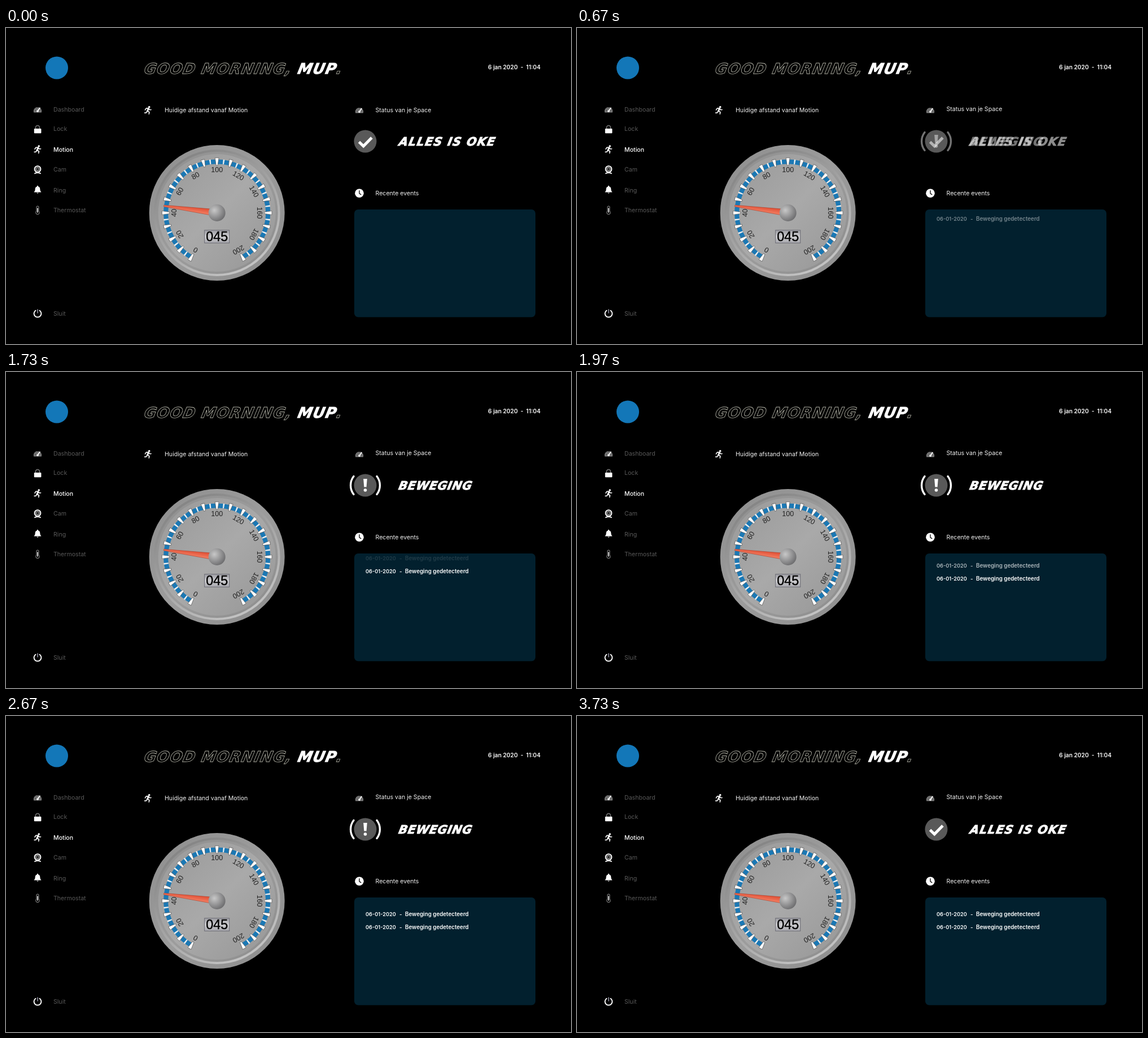
Recreate the animation shown at these times as an HTML page. Size 1001 by 559 pixels, loop 3.76 s.

```html
<!DOCTYPE html>
<html lang="nl">
<head>
<meta charset="utf-8">
<title>Dashboard</title>
<style>
  html, body { margin: 0; width: 100%; height: 100%; overflow: hidden; background: #000; }
  svg { display: block; width: 100%; height: 100%; }
  text { font: 400 10.6px Inter, sans-serif; fill: #f2f2f2; white-space: pre; }
  .dim text { fill: #585858; }
  text.on { font-weight: 500; fill: #fff; }
  text.date { font-weight: 600; font-size: 10.2px; fill: #fff; }
  .head text, .status text { font: italic 700 26px "DejaVu Sans", sans-serif; fill: #fff; stroke: #fff; stroke-width: .9; }
  .head text { letter-spacing: 1px; }
  .head text.line { fill: none; stroke: #b4b4a8; }
  .status text { font-size: 20.5px; }
  .event text { font-weight: 600; font-size: 9.8px; fill: #fff; }
  .event text.day { font-size: 9.2px; }
  #dial text { font: 12.6px "Liberation Sans", Arial, sans-serif; fill: #222; text-anchor: middle; }
  #dial text.count { font-size: 23.4px; fill: #000; stroke: #000; stroke-width: .4; }
  .stroke { fill: none; stroke: #fff; stroke-linecap: round; stroke-linejoin: round; }
</style>
</head>
<body>
<svg viewBox="0 0 1001 559">
  <defs>
    <linearGradient id="rim" x1="0" y1="0" x2="1" y2="1">
      <stop offset="0" stop-color="#8e8e8e"/><stop offset=".5" stop-color="#9c9c9c"/><stop offset="1" stop-color="#8c8c8c"/>
    </linearGradient>
    <linearGradient id="bevel" x1="0" y1="0" x2=".6" y2="1">
      <stop offset="0" stop-color="#7a7a7a"/><stop offset="1" stop-color="#c2c2c2"/>
    </linearGradient>
    <linearGradient id="face" x1="0" y1="0" x2="1" y2="1">
      <stop offset="0" stop-color="#989898"/><stop offset=".5" stop-color="#a9a9a9"/><stop offset="1" stop-color="#969696"/>
    </linearGradient>
    <linearGradient id="needle">
      <stop offset="0" stop-color="#f58468"/><stop offset="1" stop-color="#de4a30"/>
    </linearGradient>
    <radialGradient id="hub" cx=".35" cy=".35" r=".75">
      <stop offset="0" stop-color="#c8c8c8"/><stop offset="1" stop-color="#666668"/>
    </radialGradient>
    <linearGradient id="box" x1="0" y1="0" x2="0" y2="1">
      <stop offset="0" stop-color="#9a9aa0"/><stop offset=".5" stop-color="#cfcfd2"/><stop offset="1" stop-color="#a6a6ac"/>
    </linearGradient>
    <g id="meter">
      <path d="M-6.8 5A7.2 7.2 0 1 1 6.8 5Z" fill="#777"/>
      <path d="M-4.5 1.5h1.5M-3-2.2l1 1M0-4.5v1.5M4.5 1.5h-1" stroke="#222" stroke-width="1"/>
      <path d="M0 2.5L4-3" class="stroke" stroke-width="1.7"/>
      <circle cy="2.8" r="1.7" fill="#fff"/>
    </g>
    <g id="runner">
      <circle cx="2.2" cy="-5.6" r="1.8" fill="#fff"/>
      <path d="M1-2.6L-1 1.6" class="stroke" stroke-width="3"/>
      <path d="M-5-.4L-3.2-3.2L1-3.2L3.2-.6L5.6-.8M-1 1.6L2.4 3.4L1.8 6.8M-1.6 2L-3 4.6L-5.8 4.8" class="stroke" stroke-width="1.6"/>
    </g>
  </defs>

  <circle cx="90" cy="70.5" r="20" fill="#1377b8"/>

  <g class="head">
    <text class="line" transform="translate(243.5 80.5) skewX(-12)">GOOD MORNING,</text>
    <text transform="translate(515.5 80.5) skewX(-12)">MUP</text>
    <text class="line" transform="translate(584 80.5) skewX(-12)">.</text>
  </g>
  <text class="date" x="947" y="73.2" text-anchor="end">6 jan 2020  -  11:04</text>

  <g class="dim">
    <text x="84" y="148.3">Dashboard</text>
    <text x="84" y="181.5">Lock</text>
    <text x="84" y="254.4">Cam</text>
    <text x="84" y="290.8">Ring</text>
    <text x="84" y="325.6">Thermostat</text>
    <text x="84" y="508.5">Sluit</text>
  </g>
  <text class="on" x="84" y="218.7">Motion</text>

  <use href="#meter" x="56" y="144.5"/>
  <path d="M52.5 179v-3a3.5 3.5 0 0 1 7 0v3" class="stroke" style="stroke:#777" stroke-width="1.7"/>
  <rect x="49.8" y="178" width="12.6" height="8.3" rx="1" fill="#fff"/>
  <use href="#runner" x="56" y="214.6"/>
  <circle cx="56" cy="249.6" r="5.5" fill="#555" stroke="#fff" stroke-width="1.8"/>
  <circle cx="56" cy="249.6" r="2.6" fill="#222" stroke="#aaa"/>
  <path d="M51 257.3q5-2.6 10 0" class="stroke" stroke-width="1.8"/>
  <path d="M49.5 290.5q2.2-1.8 2.2-5.5q0-4 3.3-4.6v-1.4h2v1.4q3.3.6 3.3 4.6q0 3.7 2.2 5.5Z" fill="#fff"/>
  <path d="M54.2 291.4h3.6q-1.8 2.4-3.6 0" fill="#fff"/>
  <path d="M54 324v-6.8a2 2 0 0 1 4 0v6.8a3.2 3.2 0 1 1-4 0Z" fill="none" stroke="#777" stroke-width="1.2"/>
  <path d="M56 319v7" class="stroke" stroke-width="1.5"/>
  <path d="M52.5 499.7a6.4 6.4 0 1 0 7 0" class="stroke" stroke-width="1.9"/>
  <path d="M56 498v6" class="stroke" style="stroke:#889" stroke-width="1.7"/>

  <use href="#runner" x="251.5" y="145.3"/>
  <text x="281" y="148.8">Huidige afstand vanaf Motion</text>
  <use href="#meter" x="626" y="145.5"/>
  <text id="title" x="654.5">Status van je Space</text>
  <circle cx="626" cy="292.3" r="7.8" fill="#fff"/>
  <path d="M626 287.8v4.8l2.8 2" class="stroke" style="stroke:#111" stroke-width="1.4"/>
  <text x="654.5" y="295.6">Recente events</text>

  <g id="dial" transform="translate(373.7 327)"></g>

  <circle cx="636.5" cy="200.5" r="20" fill="#595959"/>
  <g class="status" id="calm">
    <path d="M625.5 201.5l7.8 7.5L648 194" class="stroke" style="stroke-linecap:butt;stroke-linejoin:miter" stroke-width="5"/>
    <text transform="translate(695 208) skewX(-12)" letter-spacing="1.4">ALLES IS OKE</text>
  </g>
  <g class="status" id="alarm">
    <path d="M633.2 189h6.6l-1.2 14.4h-4.2Z" fill="#fff"/>
    <circle cx="636.5" cy="209" r="2.8" fill="#fff"/>
    <path d="M616 184.5a26.3 26.3 0 0 0 0 32M657 184.5a26.3 26.3 0 0 1 0 32" class="stroke" stroke-width="3.4"/>
    <text transform="translate(694.5 208) skewX(-12)" letter-spacing=".7">BEWEGING</text>
  </g>

  <rect x="617" y="321" width="321" height="190.5" rx="7" fill="#02202e"/>
  <g class="event" id="first"></g>
  <g class="event" id="second"></g>
</svg>

<script>
const $ = id => document.getElementById(id);
const LOOP = 3760, FADE = 600, ROW = 23.5;

function buildDial() {
  const angle = v => v * 1.5 - 150;
  const ring = (r, fill) => `<circle r="${r}" fill="${fill}"/>`;
  let s = ring(120, 'url(#rim)') + ring(112, 'url(#bevel)') + ring(108, 'url(#rim)') + ring(104, 'url(#face)');
  s += '<path d="M-45.3 78.4A90.5 90.5 0 1 1 45.3 78.4" fill="none" stroke="#1b78b4" stroke-width="8"/>';
  for (let v = 0; v <= 200; v += 5) {
    const shape = v % 10
      ? '<path d="M-1.4-95h2.8l-.4 8.5h-2Z" fill="#eee"/>'
      : '<path d="M-3.4-97.3h6.8L1.4-84h-2.8Z" fill="#fff" stroke="#555" stroke-width=".7"/>';
    const label = v % 20 ? '' : `<text y="-71.7">${v}</text>`;
    s += `<g transform="rotate(${angle(v)})">${shape}${label}</g>`;
  }
  s += '<rect x="-22" y="30.7" width="44" height="22.6" fill="url(#box)" stroke="#6c6c74"/>';
  s += '<text class="count" y="50">045</text>';
  s += `<path transform="rotate(${angle(45)})" d="M-6 0L-1.3-95h2.6L6 0Z" fill="url(#needle)" stroke="#a8412e" stroke-width=".6"/>`;
  return s + ring(15, 'url(#hub)');
}

$('dial').innerHTML = buildDial();
$('first').innerHTML = $('second').innerHTML =
  '<text class="day" x="637" y="353.5">06-01-2020</text>' +
  '<text x="697" y="353.5">-</text>' +
  '<text x="707" y="353.5">Beweging gedetecteerd</text>';

function ease(t, start) {
  const u = Math.min(1, Math.max(0, (t - start) / FADE));
  return u * u * (3 - 2 * u);
}

function place(id, rows, opacity) {
  $(id).setAttribute('transform', `translate(0 ${rows * ROW})`);
  $(id).setAttribute('opacity', opacity);
}

function draw(now) {
  const t = now % LOOP;
  const one = ease(t, 391), two = ease(t, 1600), back = ease(t, 2870);
  const alarm = one - back;
  $('calm').setAttribute('opacity', 1 - alarm);
  $('alarm').setAttribute('opacity', alarm);
  $('title').setAttribute('y', one > 0 ? 147.3 : 148.5);
  place('first', one - 1 + two, one);
  place('second', two - 1, two);
  requestAnimationFrame(draw);
}
draw(performance.now());
</script>
</body>
</html>
```
